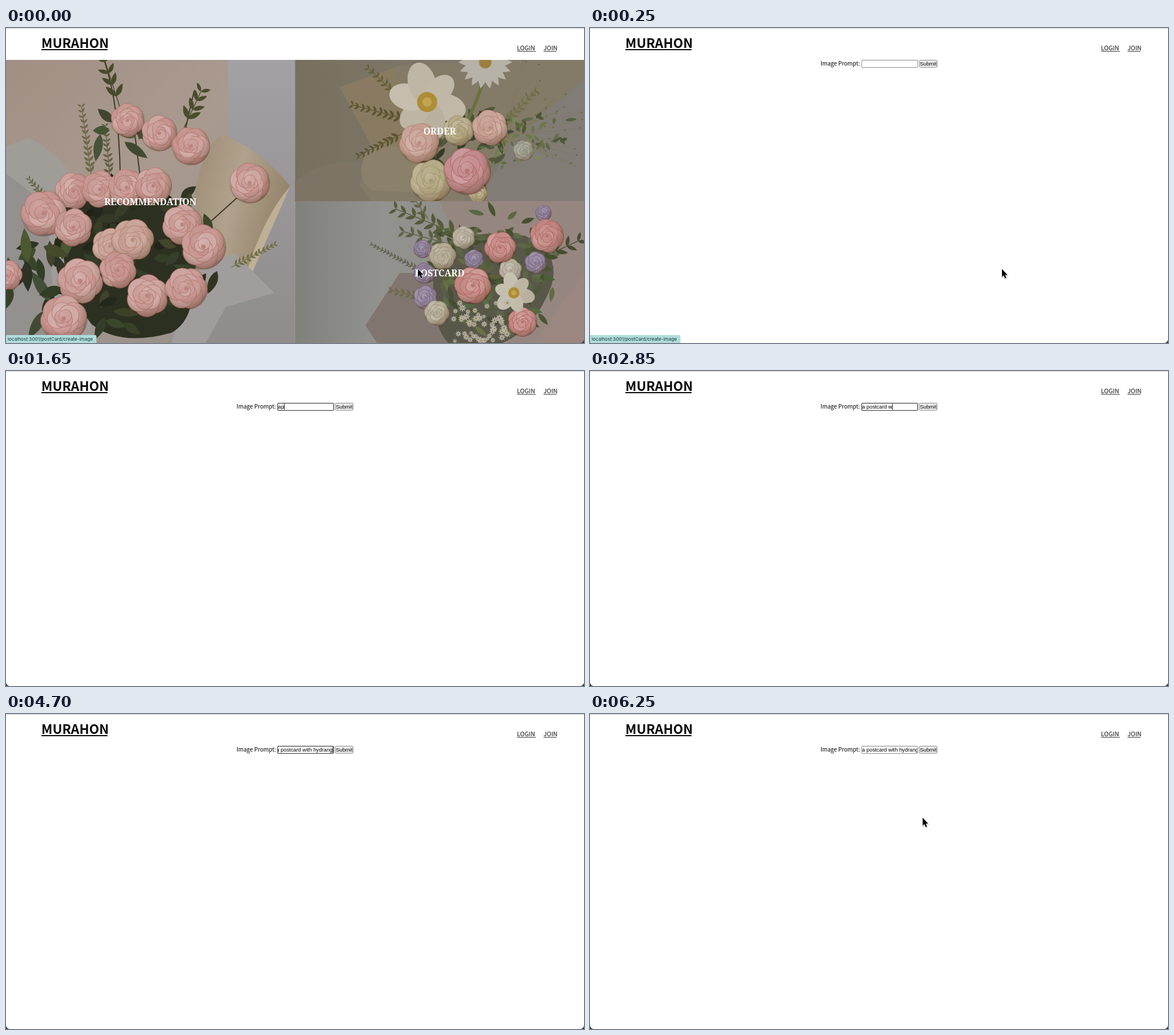
Recreate the animation shown at these times as an HTML page. Size 1013x553 px, loop 8 s.

```html
<!DOCTYPE html>
<html lang="en">
<head>
<meta charset="utf-8">
<title>Postcard prompt</title>
<style>
  html, body { margin: 0; width: 100%; height: 100%; overflow: hidden; background: #fff; }
  svg { display: block; }
  text { white-space: pre; }
  .ui { font-family: "Noto Sans CJK KR", "Noto Sans CJK JP", "Noto Sans CJK", "Noto Sans", sans-serif; }
  .control { font: 9.3px "Liberation Sans", Arial, sans-serif; }
  .title { font: 600 15.8px "Noto Serif", serif; fill: #fff; text-anchor: middle; }
  .status { font: 8.2px Inter, sans-serif; fill: #173b3b; }
</style>
</head>
<body>
<svg id="stage" width="1013" height="553" viewBox="0 0 1013 553">
  <defs>
    <linearGradient id="plaster" x2="1" y2="1">
      <stop stop-color="#a28f84"/><stop offset=".45" stop-color="#a99a8f"/><stop offset="1" stop-color="#8f8b88"/>
    </linearGradient>
    <linearGradient id="wall" x2="0" y2="1"><stop stop-color="#a3a0a6"/><stop offset="1" stop-color="#8f8c8b"/></linearGradient>
    <linearGradient id="cream" x2="1" y2=".4"><stop stop-color="#9c8b73"/><stop offset=".5" stop-color="#b0a28c"/><stop offset="1" stop-color="#94836a"/></linearGradient>
    <linearGradient id="taupe" x2="1"><stop stop-color="#77705f"/><stop offset=".5" stop-color="#7f7768"/><stop offset="1" stop-color="#7b7771"/></linearGradient>
    <linearGradient id="grey" x2="1"><stop stop-color="#81817c"/><stop offset=".3" stop-color="#92928f"/><stop offset="1" stop-color="#8d8883"/></linearGradient>
    <radialGradient id="shade" cx=".42" cy=".36" r=".66">
      <stop stop-color="#fff" stop-opacity=".12"/><stop offset=".55" stop-color="#542" stop-opacity="0"/><stop offset="1" stop-color="#421" stop-opacity=".42"/>
    </radialGradient>
  </defs>
  <rect width="1013" height="553" fill="#fff"/>
  <g id="photos">
    <svg id="left" y="56" width="506.5" height="497" viewBox="0 56 506.5 497"></svg>
    <svg id="upper" x="506.5" y="56" width="506.5" height="248" viewBox="506.5 56 506.5 248"></svg>
    <svg id="lower" x="506.5" y="304" width="506.5" height="249" viewBox="506.5 304 506.5 249"></svg>
    <text class="title" x="253" y="311">RECOMMENDATION</text>
    <text class="title" x="760" y="187">ORDER</text>
    <text class="title" x="760" y="435.5">POSTCARD</text>
  </g>
  <rect width="1013" height="1" fill="#c9c9c9"/>
  <g class="ui" fill="#080808">
    <text x="62" y="35" font-size="22.8" font-weight="700">MURAHON</text>
    <rect x="62" y="37" width="116" height="2"/>
    <g font-size="10.7" font-weight="300">
      <text x="895.5" y="39.3">LOGIN</text>
      <text x="942" y="39.3">JOIN</text>
    </g>
    <path d="M896 41H928.500M942 41H965" stroke="#222"/>
  </g>
  <g id="form">
    <text class="ui" x="404" y="65.5" font-size="10">Image Prompt:</text>
    <rect id="field" x="476.2" y="56.5" width="98" height="12.8" rx="1.5" fill="#fff"/>
    <svg x="477" y="57" width="96.5" height="12" viewBox="477 57 96.5 12">
      <text id="value" class="control" y="65.8"></text>
      <rect id="caret" y="57.5" width="1" height="10.5"/>
    </svg>
    <rect x="577.2" y="56.5" width="31" height="12.5" rx="1.5" fill="#efefef" stroke="#777" stroke-width=".9"/>
    <text class="control" x="578.3" y="65.8">Submit</text>
  </g>
  <path d="M0 547Q1 552 6 553H0ZM1013 547Q1012 552 1007 553H1013Z" fill="#3a3a3a"/>
  <g id="status">
    <path d="M0 539H156Q158.500 539 158.500 541.500V553H0Z" fill="#b0dcdb"/>
    <text class="status" x="3" y="549">localhost:3001/postCard/create-image</text>
  </g>
  <g id="arrow" stroke-linejoin="round">
    <path d="M0 0V14L3 11.300 5.300 16.500 7.600 15.500 5.400 10.500H9.600Z" transform="translate(.6 1.200)" opacity=".2" stroke="#000" stroke-width="2"/>
    <path d="M0 0V14L3 11.300 5.300 16.500 7.600 15.500 5.400 10.500H9.600Z" stroke="#fff" stroke-width="1.400" paint-order="stroke"/>
  </g>
  <path id="beam" d="M-3 -7.500Q0 -7.500 0 -5Q0 -7.500 3 -7.500M0 -5V5M-3 7.500Q0 7.500 0 5Q0 7.500 3 7.500" fill="none" stroke="#111"/>
</svg>
<script>
const $ = id => document.getElementById(id);
const mix = (a, b, k) => a + (b - a) * k;
const repeat = (n, draw) => Array.from({ length: n }, (_, i) => draw(i)).join('');

// Seeded random numbers keep the bouquets identical on every load.
let seed = 11;
const rand = (lo, hi) => {
  seed = (seed * 16807) % 2147483647;
  return mix(lo, hi, seed / 2147483647);
};
const polar = (x, y, deg, r) => [x + r * Math.cos(deg * Math.PI / 180), y + r * Math.sin(deg * Math.PI / 180)];
const disc = (x, y, r, fill) => `<circle cx="${x}" cy="${y}" r="${r}" fill="${fill}"/>`;
const shape = (d, fill) => `<path d="${d}" fill="${fill}"/>`;
const line = (d, color, width) => `<path d="${d}" fill="none" stroke="${color}" stroke-width="${width}"/>`;
const leaf = (x, y, deg, len, wide, fill) =>
  `<path d="M0 0Q${len * .4} ${-wide} ${len} 0Q${len * .4} ${wide} 0 0" fill="${fill}" transform="translate(${x} ${y}) rotate(${deg})"/>`;
const petal = (x, y, deg, len, fill) =>
  `<ellipse cx="${len / 2}" rx="${len / 2}" ry="${len * .34}" fill="${fill}" transform="translate(${x} ${y}) rotate(${deg})"/>`;

const foliage = (n, cx, cy, rx, ry, size, light) => repeat(n, () => {
  const [ux, uy] = polar(0, 0, rand(0, 360), Math.sqrt(rand(0, 1)));
  return leaf(cx + ux * rx, cy + uy * ry, rand(0, 360), size * rand(.6, 1.1), size * .33,
    `hsl(${rand(65, 92)} ${rand(16, 28)}% ${light + rand(-6, 6)}%)`);
});

function sprig(x, y, deg, len, size, fill) {
  const [ex, ey] = polar(x, y, deg, len);
  const pairs = Math.round(len / size * 1.25);
  return line(`M${x} ${y}L${ex} ${ey}`, fill, 1.4) + repeat(pairs, i => {
    const k = (i + 1) / pairs, s = size * (1.1 - .4 * k);
    const sides = [-1, 1].map(side => leaf(mix(x, ex, k), mix(y, ey, k), deg + side * rand(30, 60), s, s * .36, fill));
    return sides.join('');
  });
}

// A soft globe of overlapping petal rings, shaded towards its rim.
function rose(x, y, r, hue, sat, light) {
  const tone = d => `hsl(${hue} ${sat}% ${light + d}%)`;
  const turn = rand(0, 360);
  const ring = (n, dist, size) => repeat(n, i => {
    const [px, py] = polar(x, y, turn + (i + dist) * 360 / n, r * dist);
    return disc(px, py, r * size + 1, tone(-11)) + disc(px, py, r * size, tone(rand(-3, 5)));
  });
  return ring(6, .4, .56) + ring(5, .25, .42) + ring(4, .13, .25) + disc(x, y, r * .1, tone(-9)) + disc(x, y, r, 'url(#shade)');
}
// Evenly spaced roses between two [x, y, radius] ends.
const row = (n, from, to, tone) => repeat(n, i =>
  rose(...from.map((v, axis) => mix(v, to[axis], i / (n - 1))), ...tone));

const daisy = (x, y, r, n, fill) =>
  repeat(n, i => leaf(x, y, i * 360 / n, r, r * .36, fill)) + disc(x, y, r * .23, '#9a803c');
const lily = (x, y, r) =>
  repeat(6, i => petal(x, y, i * 60 + 15, r * rand(.85, 1.05), `hsl(42 16% ${rand(67, 74)}%)`)) +
  disc(x, y, r * .26, '#ad8d36') + disc(x, y, r * .12, '#c2a452');

const pink = [5, 33, 70], blush = [14, 32, 70], coral = [4, 36, 66], butter = [45, 24, 63], lilac = [275, 12, 58];

$('left').innerHTML =
  shape('M0 56H507V553H0Z', 'url(#plaster)') +
  shape('M389 56H507V553H300L392 300Z', 'url(#wall)') +
  shape('M0 208L40 193Q90 215 135 285L150 553H0Z', '#a09c98') +
  shape('M0 255L70 310 90 553H0Z', '#94908d') +
  shape('M330 300Q345 200 380 188Q450 215 498 278L430 433L360 400Z', 'url(#cream)') +
  shape('M498 278L430 433L422 428Q452 330 498 278', '#beb097') +
  shape('M330 430L400 395 470 465 385 490 350 553H290Z', '#a19d9c') +
  line('M200 300Q203 150 172 56M310 200Q320 150 330 110M345 352L405 298M240 300L225 180', '#3c3a26', 2) +
  sprig(200, 140, -108, 85, 25, '#454a2b') + sprig(312, 175, -65, 70, 25, '#484d2b') +
  sprig(150, 262, -98, 125, 12, '#6c6849') + sprig(182, 262, -95, 90, 11, '#5f5f41') +
  sprig(395, 420, -28, 85, 10, '#6e6b42') + sprig(70, 300, -130, 45, 10, '#64653f') +
  shape('M105 300Q190 270 285 300Q345 350 325 430Q335 510 290 535Q200 560 150 520Q80 430 105 300', '#2c3020') +
  foliage(90, 215, 400, 165, 125, 46, 17) + foliage(7, 195, 185, 50, 25, 48, 26) + foliage(12, 60, 440, 55, 75, 58, 21) +
  row(3, [213, 162, 30], [324, 207, 34], pink) + row(4, [118, 286, 33], [258, 277, 33], pink) +
  row(2, [66, 325, 41], [118, 350, 34], pink) + row(2, [309, 345, 36], [346, 384, 40], pink) +
  row(2, [182, 383, 32], [222, 372, 38], blush) + row(2, [196, 425, 33], [130, 444, 41], pink) +
  row(2, [248, 470, 38], [316, 457, 38], pink) + row(2, [2, 434, 27], [101, 510, 42], pink) + rose(427, 272, 36, ...pink);

$('upper').innerHTML =
  shape('M506 56H1013V304H506Z', 'url(#taupe)') +
  shape('M506 270Q560 225 640 238L690 304H506Z', '#7d7466') +
  shape('M585 104L690 66 860 56 1013 56V140L890 200 800 304H640L620 275 640 205Z', '#847a68') +
  shape('M585 104L680 70 745 235 640 205Z', '#897b61') +
  shape('M632 215Q690 195 750 235L740 290 640 285Q610 260 632 215', '#8b8069') +
  shape('M890 195L1013 90V304H830Z', '#817c75') +
  sprig(720, 150, -137, 115, 13, '#655f38') + sprig(700, 160, -165, 95, 13, '#5b552f') +
  sprig(695, 185, 153, 85, 12, '#59532f') + sprig(850, 190, -45, 110, 13, '#6f6f44') +
  repeat(34, () => {
    const [x, y] = polar(870, 190, rand(-75, 25), rand(75, 145));
    return line(`M870 190L${x} ${y}`, '#7c7756', .5) + disc(x, y, 1.2, '#65613f');
  }) +
  foliage(55, 800, 210, 80, 70, 28, 24) + foliage(60, 895, 200, 60, 45, 15, 38) + foliage(26, 930, 180, 70, 28, 19, 32) +
  line('M838 85Q830 120 805 170', '#6b713d', 6) + daisy(840, 60, 47, 18, '#b7b2a7') + lily(738, 130, 68) +
  row(2, [793, 180, 27], [745, 268, 38], butter) + rose(827, 290, 17, ...butter) + rose(907, 215, 18, 50, 8, 62) +
  row(2, [724, 202, 36], [848, 175, 32], blush) + rose(808, 251, 42, 357, 33, 67);

$('lower').innerHTML =
  shape('M506 304H1013V553H506Z', 'url(#grey)') +
  shape('M760 304H1013V553H860Z', '#968680') +
  shape('M690 430L630 522 650 553H820L770 430Z', '#80766f') +
  shape('M925 553L1013 430V553Z', '#9c8780') +
  shape('M755 385Q830 350 910 365Q975 395 955 455Q925 530 870 553H775Q735 510 755 385', '#59574a') +
  foliage(150, 845, 430, 120, 105, 27, 30) +
  sprig(800, 365, -158, 125, 22, '#555b38') + sprig(780, 380, 195, 85, 20, '#5d6242') +
  sprig(735, 430, -152, 105, 8, '#626151') + sprig(760, 480, 193, 85, 13, '#6b6949') +
  sprig(925, 410, -25, 85, 24, '#464c30') + sprig(740, 335, -125, 50, 14, '#606146') +
  row(3, [730, 388, 16], [735, 473, 21], lilac) + row(3, [928, 412, 19], [942, 325, 14], lilac) + rose(820, 406, 17, ...lilac) +
  row(2, [802, 368, 20], [884, 425, 20], [40, 14, 69]) + row(2, [765, 400, 24], [755, 500, 22], [42, 17, 67]) +
  row(2, [866, 385, 28], [948, 365, 30], coral) + row(2, [818, 452, 33], [905, 516, 26], coral) + lily(890, 465, 38) +
  repeat(50, () => daisy(rand(782, 880), rand(480, 552), rand(4, 7), 8, '#b5b1a6'));

// Typing bursts: start, end, characters kept from before, text added.
const bursts = [
  [1000, 1000, 0, ''], [1550, 1650, 0, 'ap'], [1800, 2200, 1, ' post'], [2500, 3000, 6, 'card with'],
  [3200, 3600, 15, ' hyd'], [3750, 4200, 18, 'dran'], [4700, 4850, 22, 'gea'], [5150, 5600, 25, ' on it'],
];
const blurTime = 6000;

function typedAt(t) {
  let text = '', idle = 0;
  for (const [start, end, keep, added] of bursts) {
    if (t < start) break;
    const k = end > start ? Math.min(1, (t - start) / (end - start)) : 1;
    text = text.slice(0, keep) + added.slice(0, 1 + Math.floor(k * (added.length - 1)));
    idle = Math.max(0, t - end);
  }
  const blinkedOff = idle % 450 >= 150 && idle % 450 < 300;
  return { text, caretOn: !blinkedOff && t >= 950 && t < blurTime };
}

// Pointer key points: time, x, y.
const stops = [[300, 722, 423], [850, 641, 91], [1100, 641, 91], [1350, 550, 62], [5700, 550, 62],
  [5850, 659, 47], [5950, 597, 62], [6000, 597, 62], [6250, 583, 182]];

function pointerAt(t) {
  const next = stops.findIndex(stop => stop[0] > t);
  if (next === 0) return stops[0].slice(1);
  if (next < 0) return stops.at(-1).slice(1);
  const [a, b] = [stops[next - 1], stops[next]];
  const k = (t - a[0]) / (b[0] - a[0]), eased = k * k * (3 - 2 * k);
  return [mix(a[1], b[1], eased), mix(a[2], b[2], eased)];
}

const ruler = document.createElement('canvas').getContext('2d');
ruler.font = '9.3px "Liberation Sans", Arial, sans-serif';
const show = (id, on) => $(id).setAttribute('visibility', on ? 'visible' : 'hidden');
const within = (t, a, b) => t >= a && t < b;

function render(t) {
  const focused = within(t, 1500, blurTime);
  const { text, caretOn } = typedAt(t);
  const width = ruler.measureText(text).width;
  const textX = 476.8 - (t < blurTime ? Math.max(0, width - 95.5) : 0);
  show('photos', t < 250);
  show('form', t >= 250);
  $('status').setAttribute('opacity', Math.min(1, Math.max(0, (800 - t) / 150)));
  $('field').setAttribute('stroke', focused ? '#222' : '#777');
  $('field').setAttribute('stroke-width', focused ? 1.1 : .9);
  $('value').textContent = text;
  $('value').setAttribute('x', textX);
  $('caret').setAttribute('x', textX + width);
  show('caret', caretOn);

  const [x, y] = pointerAt(t);
  const inField = x > 476 && x < 575 && y > 56 && y < 70;
  const hidden = within(t, 1500, 3350) || within(t, 3600, 5750);
  for (const id of ['arrow', 'beam']) $(id).setAttribute('transform', `translate(${x} ${y})`);
  show('arrow', !hidden && !inField);
  show('beam', !hidden && inField);
}

let start;
function tick(now) {
  start ??= now;
  render(Math.floor(((now - start) % 8000) / 50) * 50);
  requestAnimationFrame(tick);
}
render(0);
requestAnimationFrame(tick);
</script>
</body>
</html>
```
